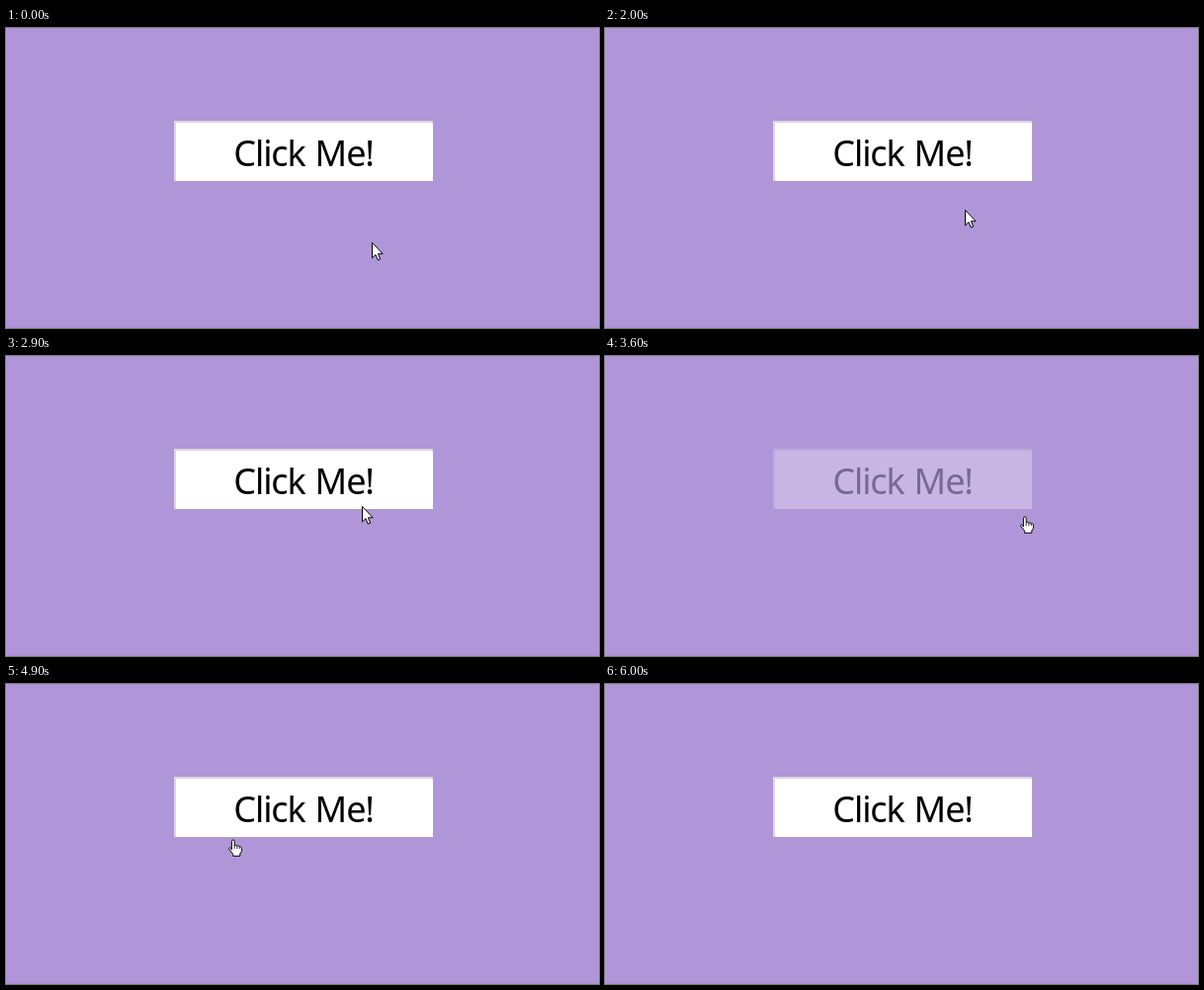
These frames come from a looping animation (600 px wide and 304 px high, 6.4 s). An HTML page:

```html
<!DOCTYPE html>
<html lang="en">
<head>
<meta charset="utf-8">
<title>Button hover</title>
<style>
  html, body { margin: 0; width: 100%; height: 100%; overflow: hidden; background: #b096d8; }
  svg { display: block; width: 600px; height: 304px; }
  text { font: 36px "Noto Sans", "Open Sans", sans-serif; letter-spacing: -1.1px; }
  .faded { opacity: .3; }
  .cursor path { fill: #fff; stroke: #000; stroke-width: 1; stroke-linejoin: round; }
</style>
</head>
<body>
<svg viewBox="0 0 600 304">
  <rect width="600" height="304" fill="#b096d8"/>
  <rect width="600" height="1" fill="#a591c8"/>
  <rect y="303" width="600" height="1" fill="#a88fce"/>

  <g id="button">
    <rect x="170" y="94" width="263" height="62" fill="#aaa1b8"/>
    <path d="M170 156V94H433L431 96H172V154Z" fill="#dcd5e6"/>
    <rect x="172" y="96" width="260" height="59" fill="#fff"/>
    <text y="140"><tspan x="230.3">Click</tspan><tspan x="312.6">Me!</tspan></text>
  </g>

  <g id="cursor" class="cursor">
    <path id="arrow" d="M.5 .5V16L4 12.7L6.3 18.2L8.7 17.2L6.4 11.8H11.2Z"/>
    <g id="hand">
      <path d="M-1.6 10V1.4a1.4 1.4 0 0 1 2.8 0V6c.5-1 2.4-.8 2.6.4 .6-.8 2.3-.5 2.5.6 .8-.6 2.1 0 2.1 1.2V11.5L6.8 14V16.3H-.3V14.3L-4.2 9.6c-.8-1.2.6-2.4 1.6-1.4Z"/>
      <path d="M1.2 6V9M3.8 6.4V9M6.3 7V9" style="stroke-width:.8"/>
    </g>
  </g>
</svg>
<script>
  const TICK = 100, LOOP = 6400;

  // Pointer route: [tick, x, y]
  const route = [
    [0, 370, 217], [5, 370, 217], [6, 367, 219], [18, 367, 219],
    [20, 364, 184], [22, 359, 130], [23, 358, 126], [24, 358, 126],
    [25, 357, 165], [26, 357, 195], [27, 357, 200], [29, 360, 152],
    [31, 376, 128], [33, 402, 126], [35, 419, 146], [36, 425, 163],
    [37, 430, 187], [38, 418, 186], [40, 362, 138], [42, 315, 124],
    [45, 245, 128], [46, 245, 128], [49, 230, 158], [50, 245, 161],
    [53, 452, 130], [55, 470, 132]
  ];
  // Inclusive tick ranges; the pointer shape trails the hover slightly
  const hovered = [[22, 25], [30, 36], [40, 48], [52, 52]];
  const pointing = [[22, 24], [30, 36], [40, 49], [52, 52]];

  const [button, cursor, arrow, hand] =
    ["button", "cursor", "arrow", "hand"].map(id => document.getElementById(id));
  const within = (ranges, tick) => ranges.some(([from, to]) => tick >= from && tick <= to);
  const show = (node, visible) => node.style.display = visible ? "" : "none";

  function positionAt(tick) {
    const next = route.findIndex(point => point[0] > tick);
    if (next < 0) return route[route.length - 1].slice(1);
    const [t0, x0, y0] = route[next - 1], [t1, x1, y1] = route[next];
    const k = (tick - t0) / (t1 - t0);
    return [x0 + (x1 - x0) * k, y0 + (y1 - y0) * k].map(Math.round);
  }

  function draw(now) {
    const tick = Math.floor(now % LOOP / TICK);
    const isHand = within(pointing, tick);
    const [x, y] = positionAt(tick);
    button.classList.toggle("faded", within(hovered, tick));
    show(cursor, tick < 56);
    show(arrow, !isHand);
    show(hand, isHand);
    cursor.setAttribute("transform", `translate(${x} ${y})`);
  }

  const start = performance.now();
  function loop() {
    draw(performance.now() - start);
    requestAnimationFrame(loop);
  }
  loop();
</script>
</body>
</html>
```
